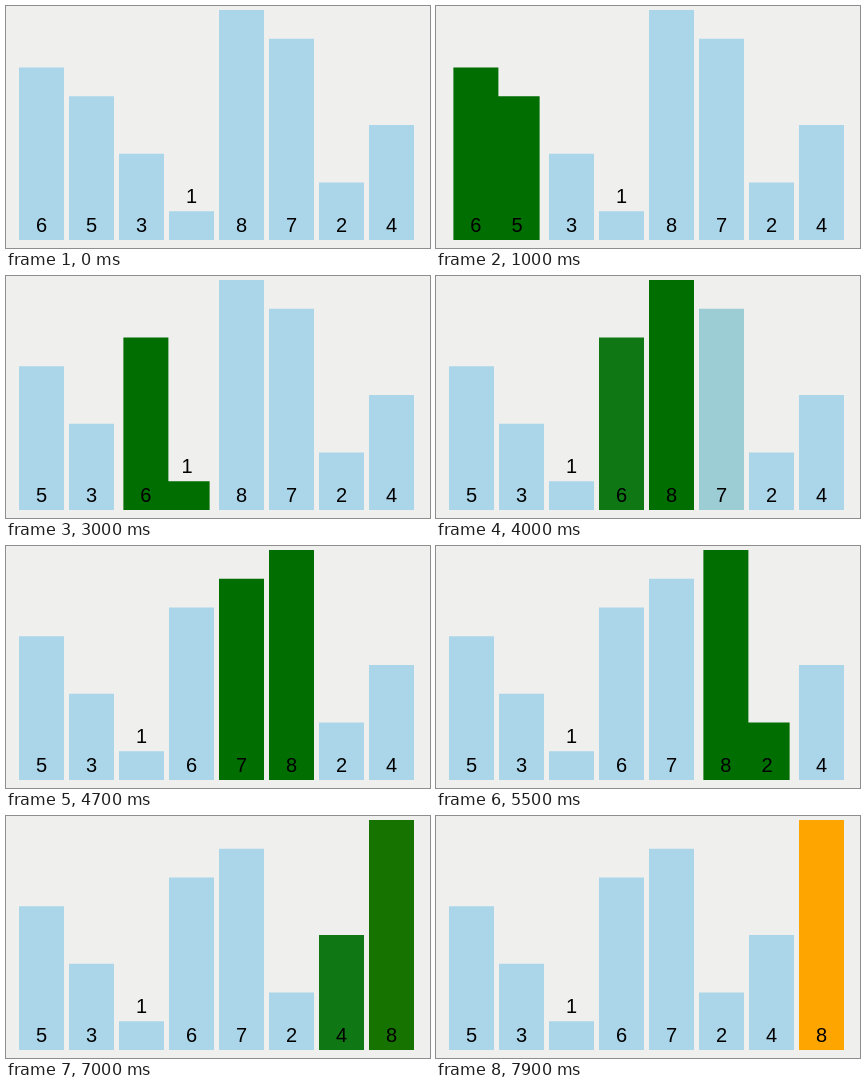
Write an HTML page that moves like this. It is 424 px wide and 242 px high and loops after 8000 ms.

```html
<!DOCTYPE html>
<html lang="en">
<head>
<meta charset="utf-8">
<title>Bubble sort, first pass</title>
<style>
  html, body { margin: 0; width: 100%; height: 100%; overflow: hidden; background: #efefee; }
  svg { display: block; width: 100vw; height: 100vh; }
  text { font: 20px "Liberation Sans", Arial, Helvetica, sans-serif; text-anchor: middle; }
</style>
</head>
<body>
<svg id="stage" viewBox="0 0 424 242"></svg>
<script>
const LOOP = 8000, STEP = 500, MOVE = 250, LEAD = 70, TICK = 100;
const LEFT = 13, PITCH = 50, WIDTH = 45, FLOOR = 234, UNIT = 28.75;
const BLUE = [171, 214, 233], GREEN = [0, 110, 0], ORANGE = [255, 165, 0];

const stage = document.getElementById('stage');
const values = [6, 5, 3, 1, 8, 7, 2, 4];

function add(parent, tag, attrs) {
  const el = document.createElementNS('http://www.w3.org/2000/svg', tag);
  for (const key in attrs) el.setAttribute(key, attrs[key]);
  return parent.appendChild(el);
}

// Each state maps a value to its slot and colour.
function snapshot(order, color, ...marked) {
  const state = {};
  order.forEach((v, i) => {
    state[v] = { x: LEFT + PITCH * i, color: marked.includes(i) ? color : BLUE };
  });
  return state;
}

function firstPass(list) {
  const a = list.slice(), last = a.length - 1;
  const states = [snapshot(a, BLUE)];
  for (let j = 0; j < last; j++) {
    states.push(snapshot(a, GREEN, j, j + 1));
    if (a[j] > a[j + 1]) {
      [a[j], a[j + 1]] = [a[j + 1], a[j]];
      states.push(snapshot(a, GREEN, j, j + 1));
    }
  }
  states.push(snapshot(a, ORANGE, last));
  return states;
}

const states = firstPass(values);

const bars = values.map(value => {
  const group = add(stage, 'g', {});
  const height = value * UNIT;
  const rect = add(group, 'rect', { y: FLOOR - height, width: WIDTH, height });
  const label = add(group, 'text', { x: WIDTH / 2, y: height < 30 ? 197 : 226 });
  label.textContent = value;
  return { value, group, rect };
});

const ease = p => p < 0.5 ? 4 * p ** 3 : 1 - 4 * (1 - p) ** 3;
const mix = (a, b, p) => a + (b - a) * p;

function draw(ms) {
  const t = Math.floor(ms % LOOP / TICK) * TICK + LEAD;
  const k = Math.floor(t / STEP), end = states.length - 1;
  const from = states[Math.min(Math.max(k - 1, 0), end)];
  const to = states[Math.min(k, end)];
  const p = ease(Math.min(1, t % STEP / MOVE));
  for (const { value, group, rect } of bars) {
    const a = from[value], b = to[value];
    const rgb = a.color.map((c, i) => Math.round(mix(c, b.color[i], p)));
    group.setAttribute('transform', `translate(${mix(a.x, b.x, p)} 0)`);
    rect.setAttribute('fill', `rgb(${rgb})`);
  }
}

const start = performance.now();
function frame() {
  draw(performance.now() - start);
  requestAnimationFrame(frame);
}
frame();
</script>
</body>
</html>
```
